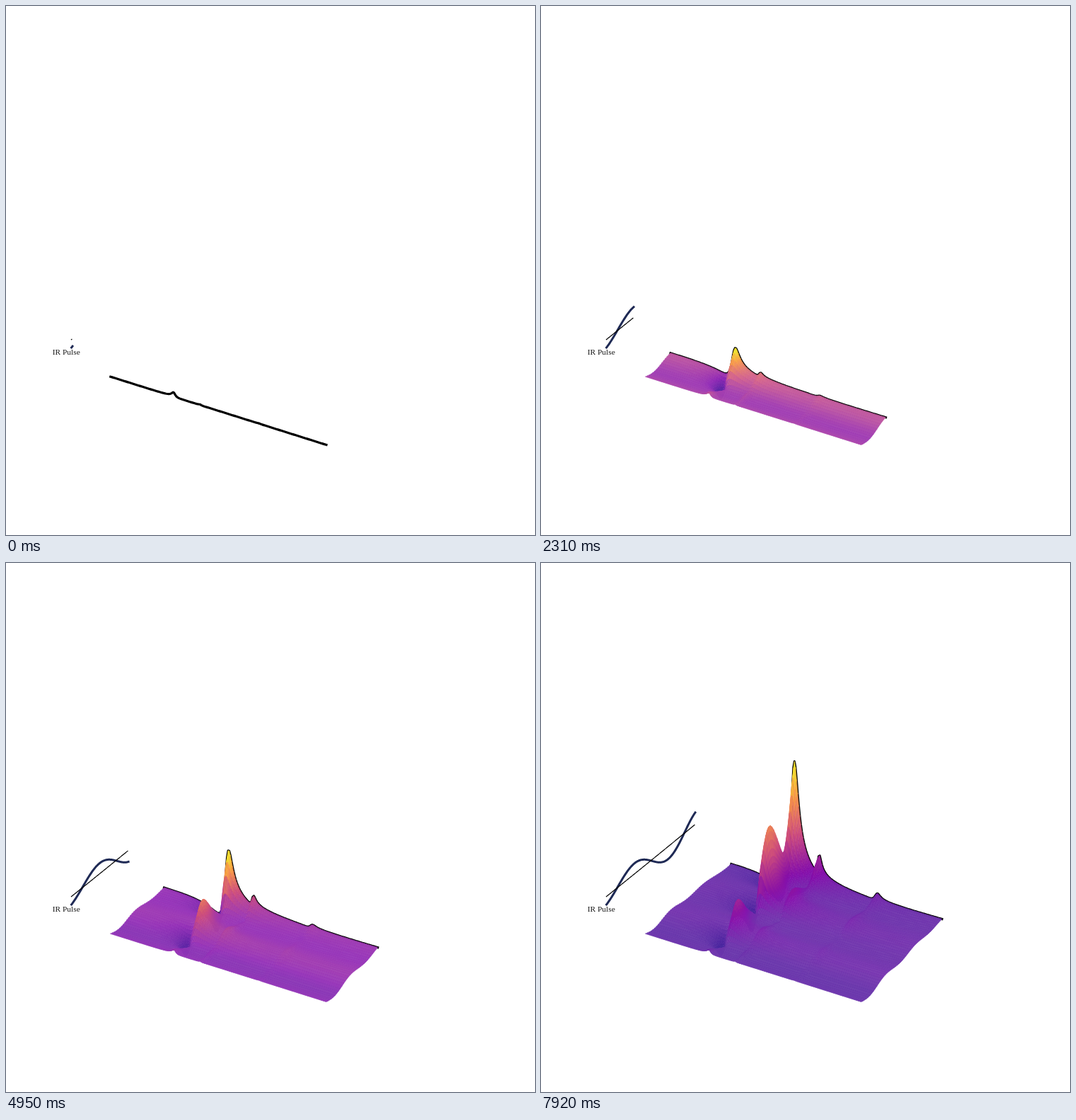
Write an HTML page with a canvas that moves like this. It is 748 by 748 pixels and loops after 8000 ms.

```html
<!DOCTYPE html>
<html lang="en">
<head>
<meta charset="utf-8">
<title>IR Pulse</title>
<style>
html, body { margin: 0; width: 100%; height: 100%; overflow: hidden; background: #fff; }
canvas { display: block; width: 100vw; height: 100vh; }
</style>
</head>
<body>
<canvas id="stage" width="748" height="748"></canvas>
<script>
const ctx = document.getElementById("stage").getContext("2d");
const LOOP = 8000, STEP = 330, LAST = 24;
const COLS = 200, SUB = 2;
const PERIOD = 18.1, ZERO = 2.6; // field period and zero crossing, in delay steps

// Each burst: centre, rise and fall widths, absorptive and dispersive strength, dip ahead of it
const bursts = [
  { at: 0, rise: 1.4, fall: 1.2, a: 6, b: -9, dip: 0 },
  { at: 8, rise: 1.4, fall: 2, a: 36, b: 34, dip: 18 },
  { at: 17, rise: 2.1, fall: 3, a: 97, b: 73, dip: 38 },
  { at: 25, rise: 1.7, fall: 3, a: 170, b: 118, dip: 10 }
];

const resonances = [
  { u: .293, width: 6.2, scale: 1, early: 0 },
  { u: .415, width: 3, scale: .15, early: 5 },
  { u: .689, width: 4.5, scale: .055, early: 1.5 }
];

const stops = [[13, 8, 135], [125, 3, 168], [203, 70, 121], [248, 148, 65], [240, 249, 33]];

const clamp = (v, lo, hi) => Math.min(hi, Math.max(lo, v));
const wave = k => 2 * Math.PI * (k - ZERO) / PERIOD;
const bell = (x, w) => Math.exp(-.5 * (x / w) ** 2);
const skewBell = (x, rise, fall) => bell(x, x < 0 ? rise : fall);

function strengths(k) {
  let a = 0, b = 0;
  for (const s of bursts) {
    const d = k - s.at;
    a += s.a * skewBell(d, s.rise, s.fall) - s.dip * bell(d + 4.2, .6);
    b += s.b * skewBell(d + 1.8, 1.7, .85 * s.fall);
  }
  return { a, b };
}

function fano(a, b, e) {
  const reach = e < 0 ? 8 : 20;
  return (a + b * e / (1 + (e / reach) ** 2)) / (1 + e * e);
}

// The background swings with the squared field and settles slowly
function lift(k) {
  return .025 * k * (LAST - k) - 4 * Math.exp(-k / 15) * Math.cos(2 * wave(k)) - .9;
}

function makeRow(k) {
  const { a, b } = strengths(k), base = lift(k);
  const early = bell(k - 3, 1.1);
  const sharpness = .5 + .5 * Math.min(1, k / 5);
  const xl = 147.8 + 5.05 * k, yl = 524.2 - 4.17 * k;
  const xr = 453 + 5 * k - .0104 * k * k, yr = 620.6 - 4.85 * k;
  return Array.from({ length: COLS + 1 }, (_, i) => {
    const u = i / COLS;
    const h = resonances.reduce((sum, r) => {
      const e = (u - r.u) * 305 / (r.width * sharpness);
      return sum + fano(r.scale * a + r.early * early, r.scale * b, e);
    }, 0);
    return { x: xl + (xr - xl) * u, y: yl + (yr - yl) * u - base - h, z: base + h, h };
  });
}

const rows = Array.from({ length: LAST * SUB + 1 }, (_, i) => makeRow(i / SUB));

function color(v, strength) {
  const s = clamp(v, 0, 1) * (stops.length - 1);
  const i = Math.min(stops.length - 2, Math.floor(s));
  const rgb = stops[i].map((c, j) => {
    const mixed = c + (stops[i + 1][j] - c) * (s - i);
    return Math.round(255 + (mixed - 255) * strength);
  });
  return `rgb(${rgb})`;
}

function polyline(points, style, width, cap) {
  ctx.beginPath();
  points.forEach(p => ctx.lineTo(p.x, p.y));
  ctx.strokeStyle = style;
  ctx.lineWidth = width;
  ctx.lineCap = cap;
  ctx.lineJoin = "round";
  ctx.stroke();
}

function drawStrip(far, near, lo, hi) {
  ctx.lineWidth = .6;
  ctx.lineJoin = "bevel";
  for (let i = 0; i < COLS; i++) {
    const quad = [far[i], far[i + 1], near[i + 1], near[i]];
    const mean = key => quad.reduce((sum, p) => sum + p[key], 0) / 4;
    const strength = .8 + .17 * Math.min(1, Math.abs(mean("h")) / 25);
    ctx.fillStyle = ctx.strokeStyle = color((mean("z") - lo) / (hi - lo), strength);
    ctx.beginPath();
    quad.forEach(p => ctx.lineTo(p.x, p.y));
    ctx.closePath();
    ctx.fill();
    ctx.stroke();
  }
}

function drawSurface(k) {
  const end = k * SUB;
  const heights = rows.slice(0, end + 1).flat().map(p => p.z);
  const lo = Math.min(...heights), hi = Math.max(...heights);
  polyline(rows[end], "#000", 3.2, "square");
  for (let r = end; r > 0; r--) drawStrip(rows[r], rows[r - 1], lo, hi);
}

function axisPoint(k) {
  return { x: 92 + 5.6 * k - .0155 * k * k, y: 472 - 4.5 * k + .0104 * k * k };
}

function pulsePoint(k) {
  const p = axisPoint(k);
  return { x: p.x + .6, y: p.y - (14 + .2 * k) * Math.sin(wave(k)) };
}

function drawPulse(k) {
  const end = Math.max(k, .25), n = 8 * k + 2;
  const path = fn => Array.from({ length: n + 1 }, (_, i) => fn(end * i / n));
  polyline(path(pulsePoint), "#1f2a55", 3, "square");
  polyline(path(axisPoint), "#000", 1.2, "butt");
  ctx.fillStyle = "#1a1a1a";
  ctx.font = '11.4px "Liberation Serif", serif';
  ctx.fillText("IR Pulse", 65.8, 493.4);
}

let shown = -1;
function tick(now) {
  const k = Math.min(LAST, Math.floor((now % LOOP) / STEP));
  if (k !== shown) {
    shown = k;
    ctx.fillStyle = "#fff";
    ctx.fillRect(0, 0, 748, 748);
    drawSurface(k);
    drawPulse(k);
  }
  requestAnimationFrame(tick);
}

tick(performance.now());
</script>
</body>
</html>
```
